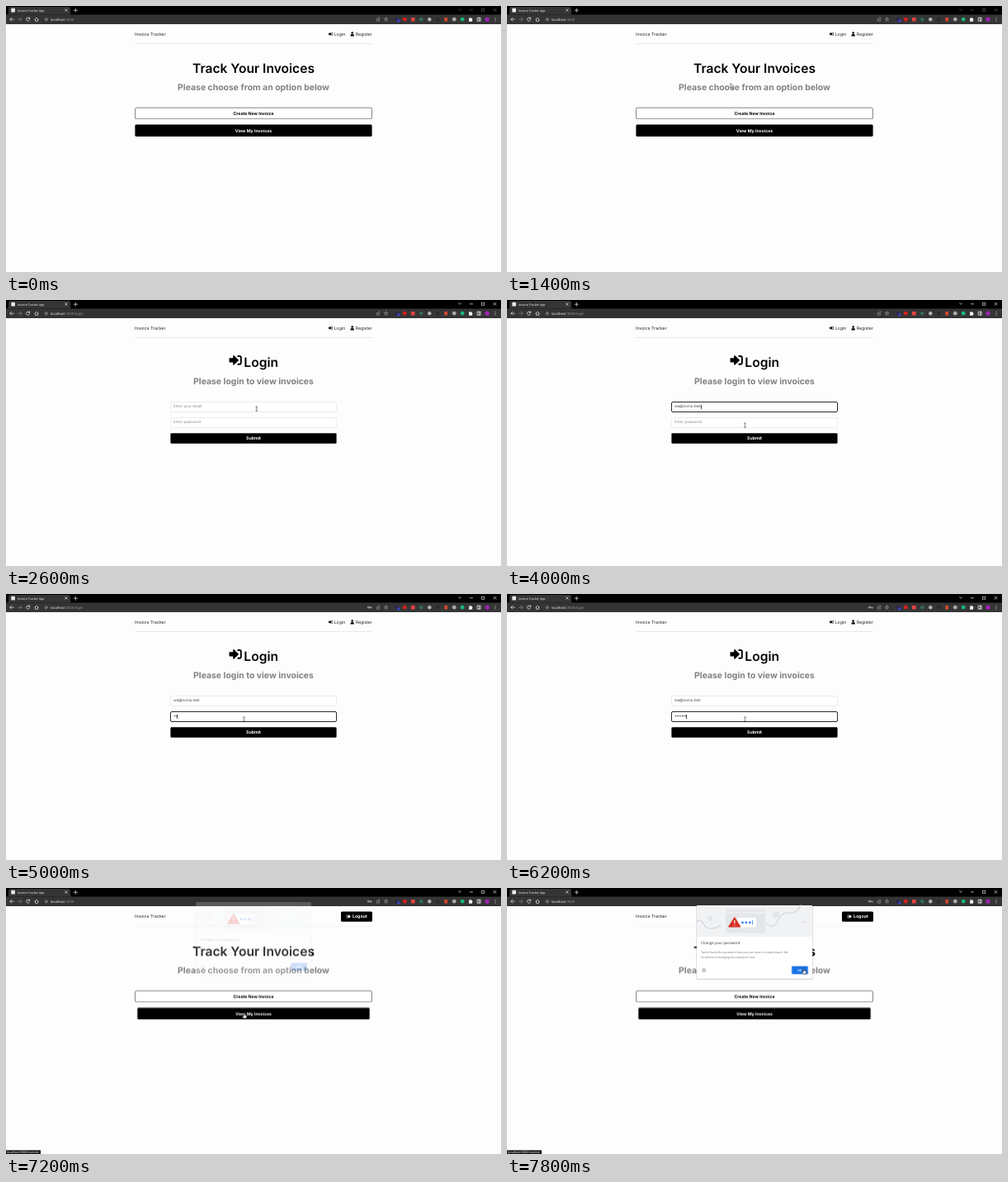
These frames come from a looping animation (600 px wide and 322 px high, 8 s). An HTML page:

```html
<!DOCTYPE html>
<html lang="en">
<head>
<meta charset="utf-8">
<title>Invoice Tracker App</title>
<style>
  html, body { margin: 0; width: 100%; height: 100%; overflow: hidden; background: #fdfdfd; }
  svg.layer { position: absolute; left: 0; top: 0; width: 600px; height: 322px; }
  text, .field { font-family: Inter, "Open Sans", sans-serif; text-rendering: geometricPrecision; }
  .ui text { font-family: "Open Sans", "Noto Sans", sans-serif; }
  .mid { text-anchor: middle; }
  .h1 { font-size: 15.6px; font-weight: 600; }
  .h2 { font-size: 10.45px; font-weight: 700; fill: #828282; }
  .nav { font-size: 5.2px; fill: #222; }
  .btn { font-size: 5.2px; font-weight: 700; }
  .line { fill: none; stroke-linecap: round; stroke-linejoin: round; }

  #fields { position: absolute; left: 0; top: 0; }
  .field {
    position: absolute; left: 199px; width: 202px; height: 13px; box-sizing: border-box;
    border: 1px solid #ececec; border-radius: 2px; background: #fff; padding-left: 3px;
    font-size: 4.5px; line-height: 11.4px; color: #555; white-space: pre;
  }
  .field::before { border-right: .6px solid transparent; }
  #email { top: 123px; }
  #password { top: 142px; }

  /* Every part shares one 8 s clock */
  .step, .field, .field::before { animation: 8s step-end infinite; }
  .glide { animation: 8s linear infinite; }
  #home { animation-name: home; }
  #login, #fields, #path, #beam { animation-name: login; }
  #guest { animation-name: before; }
  #member { animation-name: after; }
  #status { animation-name: status; }
  #controls { animation-name: focus-window; }
  #key { animation-name: key; }
  #create, #view { transform-box: fill-box; transform-origin: center; }
  #create { animation-name: hover-create; }
  #view { animation-name: hover-view; }
  #email { animation-name: focus-email; }
  #password { animation-name: focus-password; }
  #email::before { content: ""; animation-name: type-email; }
  #password::before { content: ""; animation-name: type-password; }
  #popup { animation-name: popup; }
  #cursor { animation-name: cursor; }
  #arrow { animation-name: arrow; }
  #hand { animation-name: hand; }

  @keyframes home {
    0% { opacity: 1; transform: none; }
    32% { opacity: 0; transform: none; }
    84.5%, 100% { opacity: 1; transform: translateY(1.3px); }
  }
  @keyframes login { 0%, 84.5%, 100% { opacity: 0; } 32% { opacity: 1; } }
  @keyframes before { 0% { opacity: 1; } 84.5%, 100% { opacity: 0; } }
  @keyframes after { 0% { opacity: 0; } 84.5%, 100% { opacity: 1; } }
  @keyframes status { 0% { opacity: 0; } 87%, 100% { opacity: 1; } }
  @keyframes focus-window { 0% { opacity: .4; } 32%, 100% { opacity: 1; } }
  @keyframes key { 0% { opacity: 0; } 58%, 100% { opacity: 1; } }
  @keyframes hover-create {
    0%, 26.5%, 33%, 100% { transform: none; }
    28%, 32% { transform: scale(.98); }
  }
  @keyframes hover-view {
    0%, 86% { transform: none; }
    88%, 100% { transform: scale(.98); }
  }
  @keyframes focus-email { 0%, 52.2%, 100% { border-color: #ececec; } 34.5% { border-color: #2a2a2a; } }
  @keyframes focus-password { 0% { border-color: #ececec; } 52.2%, 100% { border-color: #2a2a2a; } }
  @keyframes type-email {
    0% { content: "Enter your email"; color: #888; border-color: transparent; }
    37% { content: "w"; color: #444; border-color: #444; }
    38% { content: "wa"; }
    39.5% { content: "wa@"; }
    40.5% { content: "wa@n"; }
    41.5% { content: "wa@no"; }
    42.5% { content: "wa@nom"; }
    43.5% { content: "wa@nomu"; }
    44.5% { content: "wa@nomu."; }
    45.5% { content: "wa@nomu.t"; }
    46.5% { content: "wa@nomu.te"; }
    47.5% { content: "wa@nomu.tes"; }
    48.5% { content: "wa@nomu.test"; }
    52.2%, 100% { content: "wa@nomu.test"; color: #444; border-color: transparent; }
  }
  @keyframes type-password {
    0% { content: "Enter password"; color: #888; border-color: transparent; letter-spacing: 0; }
    57% { content: "•"; color: #333; border-color: #444; letter-spacing: -.5px; }
    60% { content: "••"; }
    63% { content: "•••"; }
    66% { content: "••••"; }
    69% { content: "•••••"; }
    72% { content: "••••••"; }
    75%, 100% { content: "•••••••"; color: #333; border-color: #444; letter-spacing: -.5px; }
  }
  @keyframes popup {
    0%, 89.2% { opacity: 0; transform: translateY(-5px); }
    90% { opacity: .2; transform: translateY(-4px); }
    92.3%, 100% { opacity: 1; transform: none; }
  }
  @keyframes cursor {
    0%, 12.4% { transform: translate(264px, 60px); }
    15% { transform: translate(265px, 70px); }
    18% { transform: translate(272px, 98px); }
    22% { transform: translate(296px, 183px); }
    24% { transform: translate(302px, 165px); }
    27%, 46% { transform: translate(303.7px, 131.7px); }
    49.3%, 92.5% { transform: translate(288.5px, 151.6px); }
    97%, 100% { transform: translate(359.5px, 98px); }
  }
  @keyframes arrow { 0%, 26.2%, 100% { opacity: 0; } 12.4% { opacity: 1; } }
  @keyframes hand { 0%, 32% { opacity: 0; } 26.2%, 84.5%, 100% { opacity: 1; } }
</style>
</head>
<body>
<svg class="layer" viewBox="0 0 600 322">
  <defs>
    <symbol id="sign-in" viewBox="0 0 16 16">
      <path d="M0 6.2Q0 5.4 .8 5.4H5V2.7Q5.2 1.5 6.3 2.2L11.6 7.4Q12.2 8 11.6 8.6L6.3 13.8Q5.2 14.5 5 13.3V10.6H.8Q0 10.6 0 9.8z"/>
      <path d="M10.5 3H13Q15 3 15 5V11Q15 13 13 13H10.5" fill="none" stroke="#000" stroke-width="2"/>
    </symbol>
    <symbol id="sign-out" viewBox="0 0 16 16">
      <path d="M5 6.2Q5 5.4 5.8 5.4H9V2.7Q9.2 1.5 10.3 2.2L15.6 7.4Q16.2 8 15.6 8.6L10.3 13.8Q9.2 14.5 9 13.3V10.6H5.8Q5 10.6 5 9.8z" fill="#fff"/>
      <path d="M5.5 3H3Q1 3 1 5V11Q1 13 3 13H5.5" fill="none" stroke="#fff" stroke-width="2"/>
    </symbol>
  </defs>

  <!-- Browser frame -->
  <g class="ui">
    <path d="M0 0H600V11H0z"/>
    <path d="M0 10.5H600V22H0z" fill="#353535"/>
    <path d="M1 10.6Q3 10.6 3 8.6V3.2Q3 1 5.2 1H75.8Q78 1 78 3.2V8.6Q78 10.6 80 10.6z" fill="#353535"/>
    <rect x="6.3" y="2.8" width="4.6" height="4.8" rx=".6" fill="#e8eaed"/>
    <text x="14" y="6.5" font-size="3.6" fill="#fff">Invoice Tracker App</text>
    <g class="line" stroke="#e8eaed" stroke-width=".7">
      <path d="M71.6 3.7L74.2 6.3M74.2 3.7L71.6 6.3M82.2 5.2H86.4M84.3 3.1V7.3"/>
      <path d="M9.4 16.2H4.8M6.8 14.2L4.8 16.2L6.8 18.2M28.4 15A2.1 2.1 0 1 0 28.6 16.9M28.6 13.8V15.3H27.1"/>
      <path d="M14.6 16.2H19M17 14.2L19 16.2L17 18.2" stroke="#85878a"/>
      <path d="M34.8 16.2L37 14.1L39.2 16.2M35.5 16V18.3H38.5V16"/>
      <g id="controls" class="step"><path d="M548.6 4L550 5.3L551.4 4M562.4 4.8H565.6M576.8 3.3H579.8V6.3H576.8zM591 3.3L594 6.3M594 3.3L591 6.3"/></g>
    </g>
    <rect x="44" y="12.2" width="422" height="8.2" rx="4.1" fill="#333"/>
    <g class="line" stroke="#b5b7ba" stroke-width=".5">
      <circle cx="48.7" cy="16.3" r="1.7"/><path d="M48.7 16.1V17.2M48.7 15.2V15.3"/>
      <path d="M449.3 15.2V18.2H452.6V16.6M450.4 16.6Q450.6 14.7 452.8 14.6M451.8 13.6L453 14.6L451.8 15.7"/>
      <path d="M460.6 13.9L461.2 15.5L462.9 15.6L461.6 16.6L462 18.3L460.6 17.4L459.2 18.3L459.6 16.6L458.3 15.6L460 15.5z"/>
      <g id="key" class="step" stroke-width=".9"><circle cx="439.4" cy="16.2" r="1"/><path d="M440.5 16.2H443.2M442.6 16.3V17.3"/></g>
    </g>
    <text x="54" y="17.8" font-size="4.2" fill="#fff">localhost<tspan fill="#999">:3000</tspan></text>
    <g id="path" class="step"><text x="82.3" y="17.8" font-size="4.2" fill="#999">/login</text></g>
    <circle cx="474" cy="16.2" r="2.2" fill="#27204e"/>
    <rect x="474.3" y="16.4" width="3" height="3" fill="#3d45c8"/>
    <circle cx="483.3" cy="16.2" r="2.4" fill="#d91e1e"/>
    <rect x="491" y="14" width="4.6" height="4.6" fill="#e2433f"/>
    <circle cx="503.3" cy="16.2" r="2.3" fill="#2f6e52"/>
    <circle cx="513.3" cy="16.2" r="2.2" fill="#b4b4b4"/>
    <circle cx="523.3" cy="16.2" r="2.1" fill="#292a2d"/>
    <rect x="531.4" y="14" width="3.6" height="4.6" fill="#d9482c"/>
    <circle cx="543.3" cy="16.2" r="2.4" fill="#a8aaa8"/>
    <circle cx="553.2" cy="16.2" r="2.4" fill="#16b877"/>
    <path d="M561 14.7H562.2Q562.8 13 563.6 14.7H565V16Q566.5 16.6 565 17.4V18.7H561V17.3Q562.2 16.6 561 16z" fill="#f1f3f4"/>
    <path d="M571.2 14.2H575.2V18.2H571.2zM573.6 14.2V18.2" fill="none" stroke="#f1f3f4" stroke-width=".8"/>
    <circle cx="583.2" cy="16.2" r="2.7" fill="#9b24b0"/>
    <g fill="#e8eaed"><circle cx="593" cy="14.4" r=".5"/><circle cx="593" cy="16.2" r=".5"/><circle cx="593" cy="18" r=".5"/></g>
  </g>

  <!-- Page header -->
  <text class="nav" x="156" y="35.8">Invoice Tracker</text>
  <g id="guest" class="step">
    <use href="#sign-in" x="390.8" y="31.2" width="5.4" height="5.4"/>
    <text class="nav" x="397.7" y="35.8">Login</text>
    <circle cx="419.7" cy="32.5" r="1.3"/><path d="M417.3 36.4Q417.3 34 419.7 34T422.1 36.4z"/>
    <text class="nav" x="423.7" y="35.8">Register</text>
    <path d="M156 45.5H444" stroke="#e8e8e8"/>
  </g>
  <g id="member" class="step">
    <rect x="406" y="28.4" width="38" height="12.4" rx="1.5"/>
    <use href="#sign-out" x="412.4" y="31.8" width="5.4" height="5.4"/>
    <text class="btn" x="420" y="36.4" fill="#fff">Logout</text>
    <path d="M156 46.7H444" stroke="#ececec" stroke-width=".6"/>
  </g>

  <g id="home" class="step">
    <text class="h1 mid" x="300" y="80.8">Track Your Invoices</text>
    <text class="h2 mid" x="300" y="102">Please choose from an option below</text>
    <g id="create" class="glide">
      <rect x="156.5" y="123.2" width="287" height="13.5" rx="1.6" fill="#fff" stroke="#333" stroke-width=".6"/>
      <text class="btn mid" x="300" y="131.7">Create New Invoice</text>
    </g>
    <g id="view" class="glide">
      <rect x="156.4" y="143.5" width="287.2" height="14.5" rx="1.4"/>
      <text class="btn mid" x="300" y="152.5" fill="#fff">View My Invoices</text>
    </g>
  </g>

  <g id="login" class="step">
    <use href="#sign-in" x="270.3" y="65.1" width="15.6" height="15.6"/>
    <text class="h1 mid" x="309.2" y="80.8">Login</text>
    <text class="h2 mid" x="300" y="102">Please login to view invoices</text>
    <rect x="199.4" y="161.2" width="201.2" height="12.6" rx="1.4"/>
    <text class="btn mid" x="300" y="169.3" fill="#fff">Submit</text>
  </g>
</svg>

<div id="fields" class="step">
  <div class="field" id="email"></div>
  <div class="field" id="password"></div>
</div>

<svg class="layer" viewBox="0 0 600 322">
  <g id="status" class="step ui">
    <rect y="317.4" width="42" height="4.6" fill="#17181a"/>
    <text x="1.2" y="321" font-size="3.55" fill="#fff">localhost:3000/invoices</text>
  </g>

  <g id="popup" class="glide ui">
    <rect x="229.3" y="21" width="141.4" height="90" rx="1.5" fill="#000" opacity=".16"/>
    <rect x="230" y="21" width="140" height="88.8" rx="1.2" fill="#fff"/>
    <path d="M230 21H370V59H230z" fill="#f1f2f3"/>
    <g class="line" stroke="#d3d6d9" stroke-width="1.2">
      <path d="M230 41Q235 36 238 43T248 49T259 45"/>
      <path d="M314 42Q322 52 328 40T342 30T356 21"/>
      <path d="M358.5 41H363"/>
    </g>
    <circle cx="246" cy="37" r="3" fill="#e3e5e7"/>
    <circle cx="326" cy="32" r="4" fill="#e3e5e7"/>
    <rect x="265" y="25.5" width="48" height="29" rx="2" fill="#e4e7ea"/>
    <path d="M265 30H313" stroke="#f5f6f7"/>
    <rect x="279" y="36" width="23" height="11.5" rx="1" fill="#fff"/>
    <g fill="#2f7de1">
      <circle cx="285.5" cy="41.8" r="1.4"/><circle cx="289.9" cy="41.8" r="1.4"/><circle cx="294.3" cy="41.8" r="1.4"/>
      <rect x="297.2" y="39.2" width=".8" height="5.2"/>
    </g>
    <path d="M275.8 35.6L283 47H268.6z" fill="#d93025" stroke="#d93025" stroke-linejoin="round"/>
    <path d="M275.8 39V43M275.8 44.6V45.6" stroke="#fff" stroke-width="1.2"/>
    <text x="235" y="68.2" font-size="4.45" fill="#303236">Change your password</text>
    <g font-size="3.45" fill="#6a6d70">
      <text x="235" y="78.6">Tabrix found the password that you just used in a data breach. We</text>
      <text x="235" y="85.2">recommend changing this password now</text>
    </g>
    <circle cx="238.7" cy="99.5" r="1.9" fill="none" stroke="#5f6368" stroke-width=".6"/>
    <path d="M238.7 99.2V100.6M238.7 98.2V98.6" stroke="#5f6368" stroke-width=".5"/>
    <rect x="344.6" y="94" width="20.8" height="10.8" rx="1.4" fill="#a9c8f7"/>
    <rect x="345.5" y="94.9" width="19" height="9" rx="1" fill="#1a73e8"/>
    <text class="mid" x="354.6" y="100.8" font-size="3.7" font-weight="600" fill="#fff">OK</text>
  </g>

  <g id="cursor" class="glide">
    <g id="arrow" class="step"><path d="M0 0V6L1.4 4.8L2.4 7L3.3 6.6L2.4 4.5H4.2z" fill="#fff" stroke="#000" stroke-width=".5"/></g>
    <g id="beam" class="step"><path d="M-1.2 -2.7H1.2M0 -2.7V2.7M-1.2 2.7H1.2" stroke="#222" stroke-width=".65"/></g>
    <g id="hand" class="step"><path d="M-.6 .3Q0 -.5 .6 .3V2.1L2.9 2.6Q3.4 2.8 3.3 3.5L2.7 6.2H-.5L-2.2 3.8Q-2 3 -1.2 3.4L-.6 3.9z" fill="#fff" stroke="#000" stroke-width=".55" stroke-linejoin="round"/></g>
  </g>
</svg>
</body>
</html>
```
